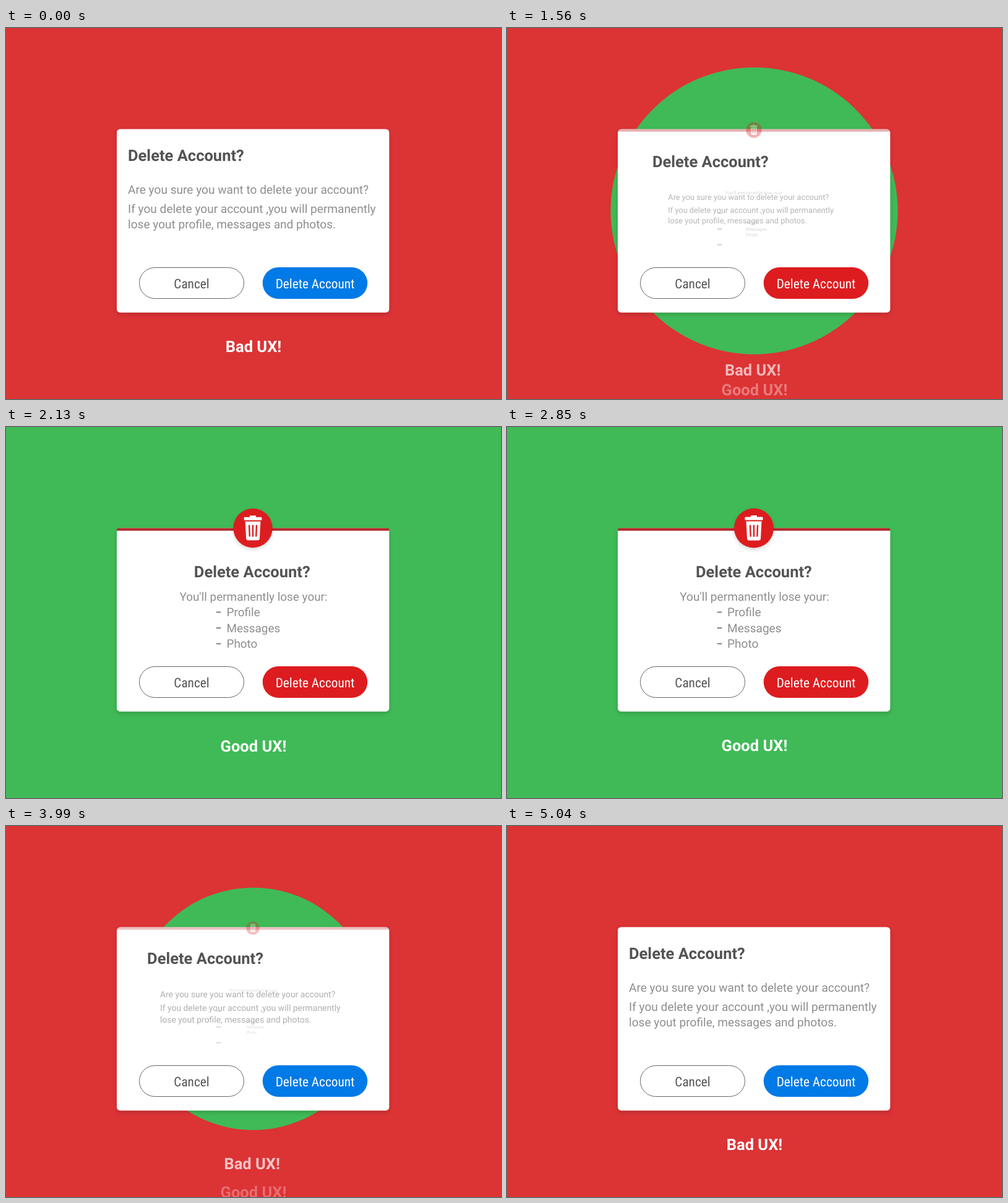
An HTML page for the animation above (5.07 s loop, 800x600 px).

```html
<!DOCTYPE html>
<html lang="en">
<head>
<meta charset="utf-8">
<title>Delete account dialog</title>
<style>
  html, body { margin: 0; height: 100%; overflow: hidden; background: #dc3335; }
  svg { display: block; width: 100vw; height: 100vh; }
  text { font-family: Roboto, sans-serif; text-rendering: geometricPrecision; }
  .body text { font-size: 19.1px; fill: #8e8e8e; }
  .bold { font-weight: 700; font-size: 25.5px; }
  .caption { fill: #fff; text-anchor: middle; }
  .button { font-family: "Roboto Condensed", Roboto, sans-serif; font-stretch: 75%; font-size: 21.3px; text-anchor: middle; }
  .shadow { filter: drop-shadow(0 3px 3px rgba(0, 0, 0, .16)); }
</style>
</head>
<body>
<svg viewBox="0 0 800 600">
  <rect width="800" height="600" fill="#dc3335"/>
  <circle id="reveal" cx="399.5" cy="295.7" fill="#3fba56"/>

  <text id="bad" class="bold caption" y="524">Bad UX!</text>
  <text id="good" class="bold caption" x="400" y="524">Good UX!</text>

  <rect class="shadow" x="179" y="163.5" width="440.3" height="296.7" rx="5.5" fill="#fff"/>
  <path id="bar" d="M179 167.7v-1.2q0-3 4-3h432.3q4 0 4 3v1.2z" fill="#b4272a"/>

  <text id="title" class="bold" fill="#535353">Delete Account?</text>

  <g class="body">
    <g id="warning">
      <text x="197" y="268">Are you sure you want to delete your account?</text>
      <text x="197" y="299">If you delete your account ,you will permanently</text>
      <text x="197" y="324.3">lose yout profile, messages and photos.</text>
    </g>
    <text id="lead" x="400" y="281" text-anchor="middle">You'll permanently lose your:</text>
    <g id="list">
      <text x="356" y="306.3">Profile</text>
      <text x="356" y="331.8">Messages</text>
      <text x="356" y="357.3">Photo</text>
    </g>
    <path id="dashes" d="M339.7 299.5h7.6m-7.6 25.5h7.6m-7.6 25.5h7.6" stroke="#808080" stroke-width="2"/>
  </g>

  <rect x="215.5" y="387.5" width="169" height="50" rx="25" fill="#fff" stroke="#666"/>
  <text class="button" x="300" y="421" fill="#555">Cancel</text>
  <rect id="confirm" x="414.7" y="387" width="169.5" height="51" rx="25.5"/>
  <text class="button" x="499.5" y="421" fill="#fff">Delete Account</text>

  <g id="icon">
    <circle class="shadow" r="32" fill="#dd1c1f"/>
    <g fill="#fff">
      <path d="M-5-20.5H5V-18H13.5Q14.5-18 14.5-17V-13H-14.5V-17Q-14.5-18-13.5-18H-5z"/>
      <path d="M-12.5-11H12.5L11 17Q10.8 20 8 20H-8Q-10.8 20-11 17z"/>
    </g>
    <path d="M-6-4L-5.3 13M0-4V13M6-4L5.3 13" stroke="#dd1c1f" stroke-width="2.4" stroke-linecap="round"/>
  </g>
</svg>
<script>
const LOOP = 5070, SPAN = 1000, OPEN = 1267, BACK = 3536;
const el = id => document.getElementById(id);
const set = (id, attrs) => {
  for (const name in attrs) el(id).setAttribute(name, attrs[name]);
};
const mix = (a, b, p) => a + (b - a) * p;

// cubic-bezier(.4, 0, .2, 1)
function ease(x) {
  if (x <= 0) return 0;
  if (x >= 1) return 1;
  let lo = 0, hi = 1, s;
  for (let i = 0; i < 24; i++) {
    s = (lo + hi) / 2;
    const bx = 1.2 * s * (1 - s) ** 2 + .6 * s * s * (1 - s) + s ** 3;
    if (bx < x) lo = s; else hi = s;
  }
  return s * s * (3 - 2 * s);
}

const scaleAt = (x, y, k) => `translate(${x} ${y}) scale(${k}) translate(${-x} ${-y})`;

function draw(t) {
  const p = ease((t - OPEN) / SPAN) - ease((t - BACK) / SPAN);
  const q = 1 - p;
  const grow = mix(.055, 1, p), shrink = mix(1, .055, p);

  set('reveal', { r: mix(32, 602, p) });
  set('bad', { x: 400 - 8 * p, y: 524 + 108 * p, opacity: q });
  set('good', { y: 524 + 108 * q, opacity: p });
  set('title', { x: mix(197, 305, p), y: mix(214.5, 243.2, p) });

  set('warning', { transform: scaleAt(388, 299.5, shrink), opacity: q });
  set('lead', { transform: scaleAt(400, 262, grow), opacity: p });
  set('list', { transform: scaleAt(404.5, 325, grow), opacity: p });
  set('dashes', { opacity: p });
  set('bar', { opacity: p });

  const iconY = mix(165.5, 163.5, p);
  set('icon', { transform: `translate(399 ${iconY}) scale(${mix(.065, 1, p)})`, opacity: p });
  set('confirm', { fill: t >= OPEN && t < BACK ? '#dd1c1f' : '#007ae7' });
}

const start = performance.now();
function tick() {
  draw((performance.now() - start) % LOOP);
  requestAnimationFrame(tick);
}
tick();
</script>
</body>
</html>
```
